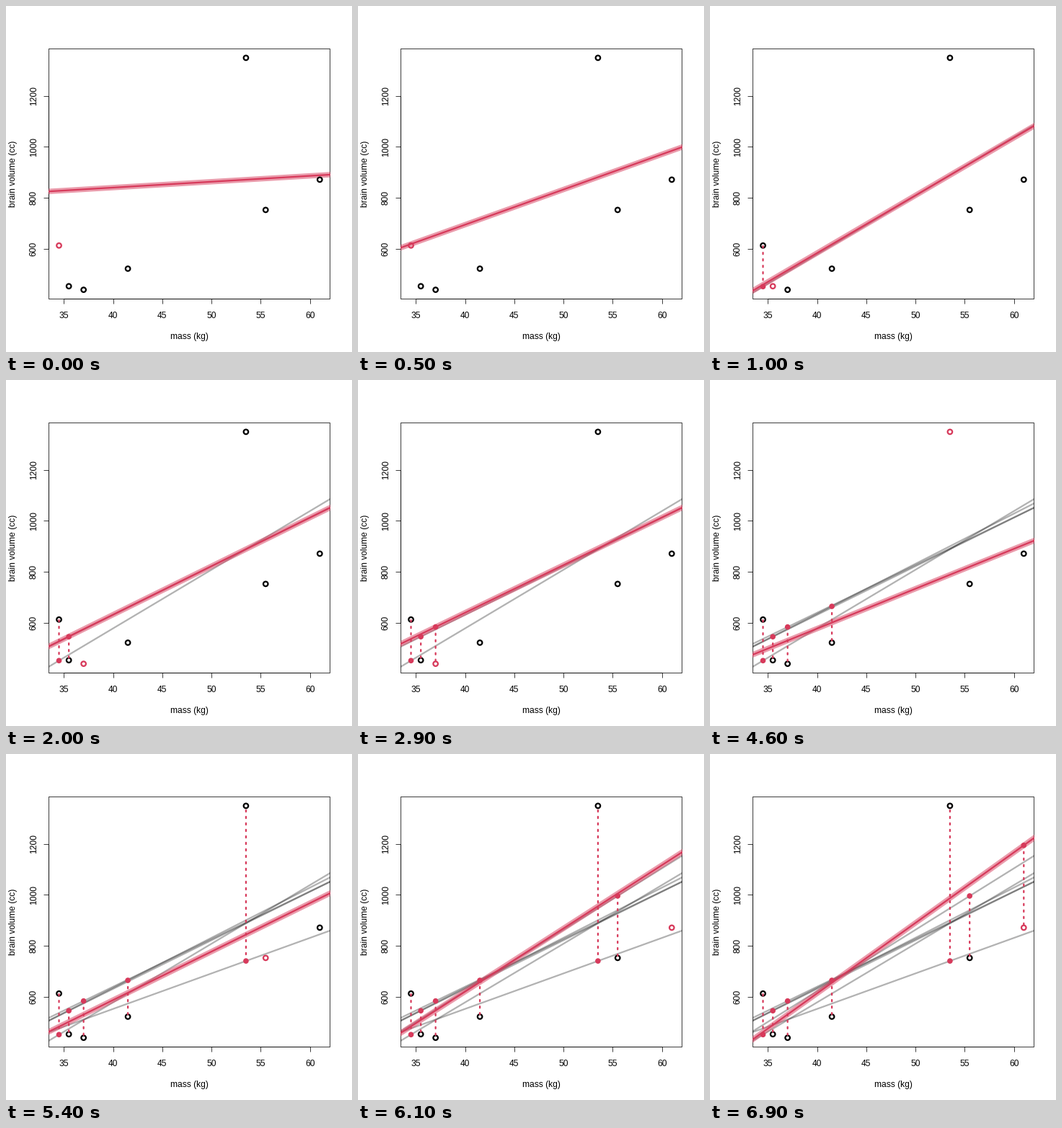
Recreate the animation shown at these times as a matplotlib script. Size 480 px wide and 480 px high, loop 7000 ms.

```python
import matplotlib.pyplot as plt
from matplotlib.animation import FuncAnimation
from matplotlib.patches import Circle, Rectangle

SIZE, DPI = 480, 72
STEPS = 10  # frames per left-out point
RED = "#d73a5b"
LEFT, RIGHT, TOP, BOTTOM = 59.04, 449.76, 59.04, 406.56
X0, X1 = 33.44, 62.06
Y0, Y1 = 401.52, 1386.48

mass = [34.5, 35.5, 37.0, 41.5, 53.5, 55.5, 61.0]
brain = [612, 452, 438, 521, 1350, 752, 871]

# Each fit is its height at the left and right edge of the plot;
# the first is the flat starting line, then one per left-out point.
fits = [(869, 869), (426, 1086), (505, 1052), (516, 1052), (505, 1069),
        (460, 859.5), (463, 1154), (431, 1224)]

plt.rcParams["font.family"] = "Liberation Sans"
fig = plt.figure(figsize=(SIZE / DPI, SIZE / DPI), dpi=DPI, facecolor="white")
ax = fig.add_axes([0, 0, 1, 1])
ax.set_xlim(0, SIZE)
ax.set_ylim(SIZE, 0)
ax.axis("off")


def px(m):
    return LEFT + (m - X0) / (X1 - X0) * (RIGHT - LEFT)


def py(v):
    return BOTTOM - (v - Y0) / (Y1 - Y0) * (BOTTOM - TOP)


def value(fit, m):
    a, b = fit
    return a + (b - a) * (m - X0) / (X1 - X0)


def mix(p, q, u):
    return tuple(a + (b - a) * u for a, b in zip(p, q))


def rule(xs, ys):
    ax.plot(xs, ys, color="black", lw=0.75, solid_capstyle="butt", zorder=1)


def label(x, y, s, rotation=0):
    ax.text(x, y, s, fontsize=12, rotation=rotation,
            ha="right" if rotation else "center",
            va="center" if rotation else "baseline")


def side_label(x, y, s):
    # Rotated text whose baseline lies on x
    ax.text(x, y, s, fontsize=12, rotation=90, rotation_mode="anchor",
            ha="center", va="baseline")


def draw_frame():
    l, r, t, b = 59, 449, 59, 406
    rule([l, r, r, l, l], [t, t, b, b, t])
    rule([px(35), px(60)], [b, b])
    rule([l, l], [py(600), py(1200)])
    for m in range(35, 61, 5):
        rule([px(m)] * 2, [b, b + 7.2])
        label(px(m), 432.7, str(m))
    for v in range(600, 1201, 200):
        rule([l - 7.2, l], [py(v)] * 2)
        side_label(41.8, py(v), str(v))
    label((LEFT + RIGHT) / 2, 461.7, "mass (kg)")
    side_label(12.9, (TOP + BOTTOM) / 2, "brain volume (cc)")


clip = Rectangle((LEFT, TOP), RIGHT - LEFT, BOTTOM - TOP,
                 transform=ax.transData)


def fit_line(color, width, alpha, z):
    line, = ax.plot([], [], color=color, lw=width, alpha=alpha, zorder=z)
    line.set_clip_path(clip)
    return line


def place(line, fit):
    ends = (X0 - 1, X1 + 1)
    line.set_data([px(m) for m in ends], [py(value(fit, m)) for m in ends])


draw_frame()
band = fit_line(RED, 7.5, 0.5, 3)
core = fit_line(RED, 2.25, 1, 4)

rings, dots, gaps, olds = [], [], [], []
for m, v, fit in zip(mass, brain, fits[1:]):
    x, y, guess = px(m), py(v), py(value(fit, m))
    rings.append(ax.add_patch(Circle((x, y), 3.24, fill=False, lw=2.25,
                                     zorder=5)))
    gap, = ax.plot([x, x], [guess, y], color=RED, lw=2.25, zorder=6,
                   ls=(0, (1, 3)), dash_capstyle="round", snap=False)
    gaps.append(gap)
    dots.append(ax.add_patch(Circle((x, guess), 3.8, fc=RED, lw=0, zorder=7)))
    old = fit_line("black", 2.25, 0.3, 2)
    place(old, fit)
    olds.append(old)


def update(n):
    cur, k = divmod(n, STEPS)
    u = (k + 1) / STEPS
    now = mix(fits[cur], fits[cur + 1], u)
    place(band, now)
    place(core, now)
    for i in range(len(mass)):
        rings[i].set_edgecolor(RED if i == cur else "black")
        olds[i].set_visible(i < cur)
        done = i < cur or (i == cur and k == STEPS - 1)
        gaps[i].set_visible(done)
        dots[i].set_visible(done)
    return [band, core, *rings, *olds, *gaps, *dots]


anim = FuncAnimation(fig, update, frames=STEPS * len(mass), interval=100,
                     repeat=True, repeat_delay=0, blit=False)
plt.show()
```
